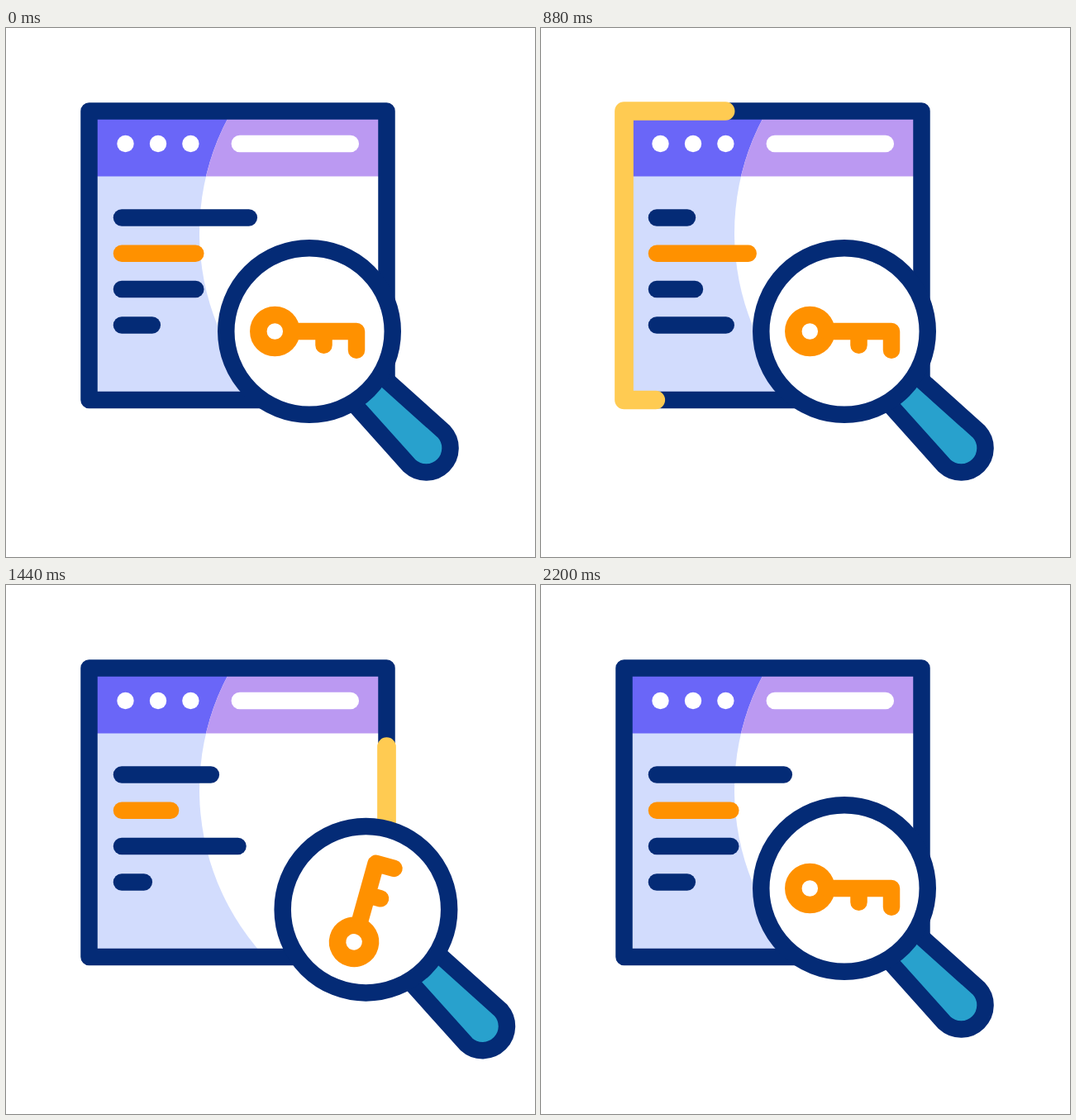
Animation of 640 by 640 pixels, one loop 2400 ms. Source, as an HTML page:

```html
<!DOCTYPE html>
<html>
<head>
<meta charset="utf-8">
<style>
html, body { margin: 0; width: 100%; height: 100%; overflow: hidden; background: #fff; }
svg { display: block; width: 100vw; height: 100vh; }
.line { fill: none; stroke-width: 20.5; stroke-linecap: round; stroke-linejoin: round; }
.navy { stroke: #042b76; }
.orange { stroke: #ff9100; }
</style>
</head>
<body>
<svg viewBox="0 0 640 640">
  <clipPath id="page"><path d="M100 100H461V450H100Z"/></clipPath>
  <g clip-path="url(#page)">
    <path fill="#d2dcfd" d="M100 100H461V450H100Z"/>
    <path fill="#6a66f8" d="M100 100H461V179.5H100Z"/>
    <circle cx="531" cy="248" r="297" fill="#fff"/>
    <clipPath id="glow"><circle cx="531" cy="248" r="297"/></clipPath>
    <path fill="#bb99f2" clip-path="url(#glow)" d="M100 100H461V179.5H100Z"/>
  </g>
  <g fill="#fff">
    <circle cx="144.5" cy="140" r="10.2"/>
    <circle cx="184" cy="140" r="10.2"/>
    <circle cx="223.4" cy="140" r="10.2"/>
  </g>
  <path class="line" stroke="#fff" d="M282.8 140H416.8"/>
  <path class="line navy" d="M100.5 100.5H460.5V450H100.5Z"/>
  <g id="rows">
    <path class="line navy"/>
    <path class="line orange"/>
    <path class="line navy"/>
    <path class="line navy"/>
  </g>
  <path id="runner" class="line" stroke="#ffcb52" style="stroke-width:22.7" pathLength="1"
    d="M309 450H100.5V100.5H460.5V450H309"/>
  <path id="orbit" fill="none" d="M0 0A42 33 0 0 0 84 0A42 40 0 0 0 0 0"/>
  <g id="glass">
    <path class="line navy" style="fill:#28a1cd"
      d="M443 410.5L529.8 488.4A29.3 29.3 0 0 1 488.4 529.8L410.5 443"/>
    <circle class="line navy" style="fill:#fff" cx="367" cy="367" r="100.75"/>
    <g id="key" class="line orange">
      <circle cx="325.3" cy="367" r="20"/>
      <path d="M346 367H424V389.7M384.5 367V383.7"/>
    </g>
  </g>
</svg>
<script>
const $ = id => document.getElementById(id);
const LOOP = 2400;
const rows = [...$('rows').children];
const orbit = $('orbit'), orbitLength = orbit.getTotalLength();
const halfOrbit = new DOMPoint(84, 0);

// Right ends of the text rows at each key time
const rowTimes = [200, 800, 1300, 1800];
const rowEnds = [
  [304, 182.6, 247, 304],
  [239.5, 265.3, 202, 239.5],
  [239.5, 188.1, 303, 239.5],
  [187, 238.4, 174.6, 187]
];

const ramp = (t, a, b) => Math.min(1, Math.max(0, (t - a) / (b - a)));
const ease = (t, a, b) => { const u = ramp(t, a, b); return u * u * (3 - 2 * u); };
const keyed = (t, times, values) => values.slice(1).reduce(
  (sum, v, i) => sum + (v - values[i]) * ease(t, times[i], times[i + 1]), values[0]);

// Length of the lower half of the orbit, found where it reaches the far side
let lower = 0, upper = orbitLength * 0.6;
for (let i = 0; i < 30; i++) {
  const mid = (lower + upper) / 2;
  if (orbit.getPointAtLength(mid).y > halfOrbit.y) lower = mid; else upper = mid;
}

function draw(t) {
  rows.forEach((row, i) => {
    row.setAttribute('d', `M140 ${229.5 + i * 43.3}H${keyed(t, rowTimes, rowEnds[i]) - 10.2}`);
  });

  const head = ease(t, 200, 1600), tail = ease(t, 600, 1900);
  const runner = $('runner');
  runner.style.display = head > tail ? '' : 'none';
  runner.setAttribute('stroke-dasharray', `${head - tail} 2`);
  runner.setAttribute('stroke-dashoffset', -tail);

  const along = lower * ramp(t, 1000, 1600) + (orbitLength - lower) * ramp(t, 1600, 2200);
  const p = orbit.getPointAtLength(along);
  $('glass').setAttribute('transform', `translate(${p.x} ${p.y})`);
  const turn = -90 * (ease(t, 1000, 1600) - ease(t, 1600, 2200));
  $('key').setAttribute('transform', `rotate(${turn} 364.8 368.6)`);
}

const start = performance.now();
function tick() {
  draw((performance.now() - start) % LOOP);
  requestAnimationFrame(tick);
}
tick();
</script>
</body>
</html>
```
